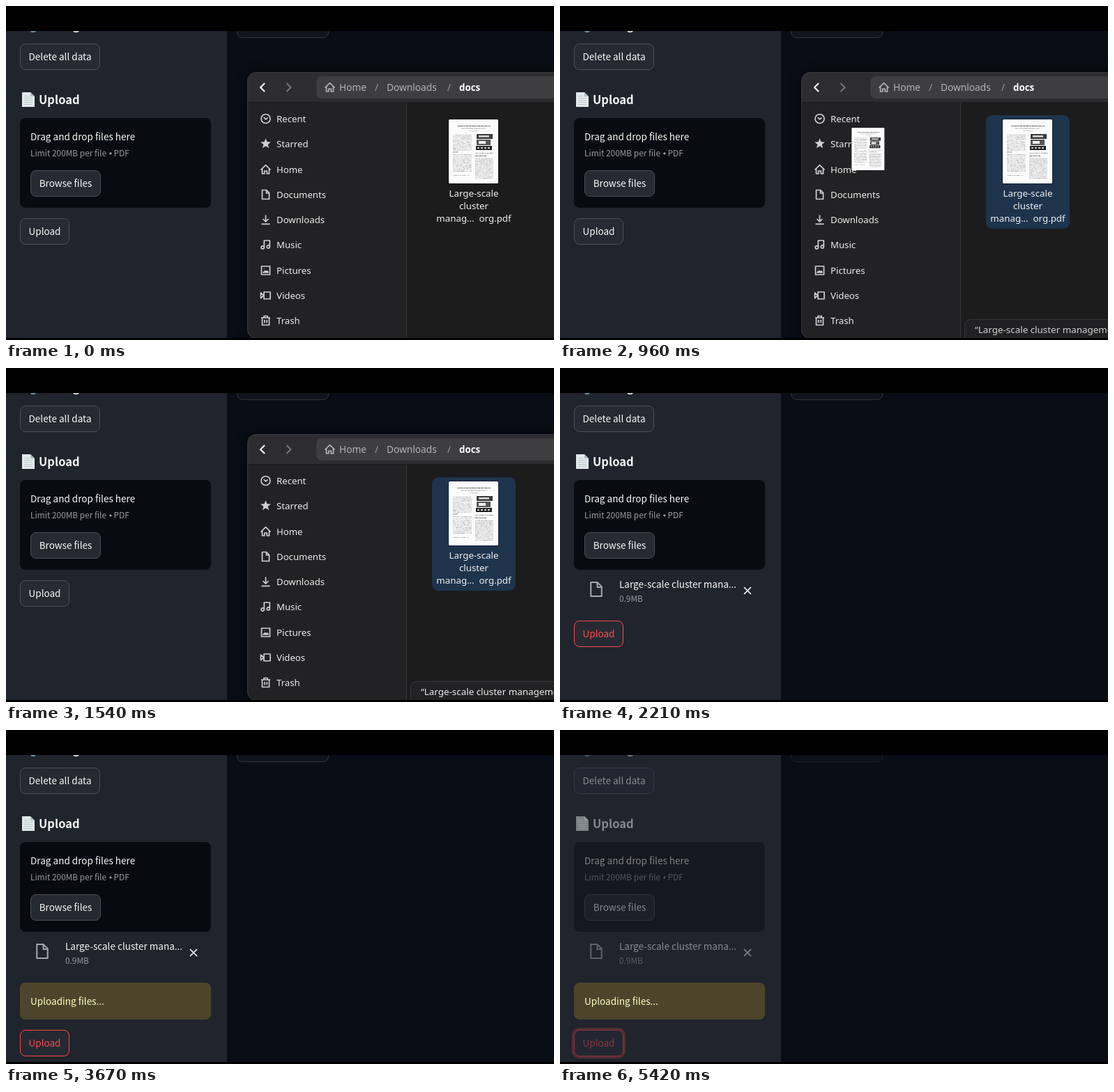
An HTML page with a canvas that plays this animation: 786 by 480 pixels, repeating every 5960 ms.

```html
<!DOCTYPE html>
<html lang="en">
<head>
<meta charset="utf-8">
<title>Upload a file</title>
<style>
html, body { margin: 0; width: 100%; height: 100%; overflow: hidden; background: #000; }
canvas { display: block; }
</style>
</head>
<body>
<canvas id="stage" width="786" height="480"></canvas>
<script>
const ctx = document.getElementById('stage').getContext('2d');
const LOOP = 5960;
const WEB = '"Noto Sans CJK SC", "Noto Sans CJK JP", "Noto Sans CJK", sans-serif';
const DESK = '"Noto Sans", sans-serif';
const BODY = '13.55px ' + WEB, SMALL = '11.85px ' + WEB, HEAD = 'bold 16.5px ' + WEB;
const LABEL = '13.3px ' + DESK, PLACE = '13.2px ' + DESK, CRUMB = '500 13.7px ' + DESK;
const RED = '#ff4b4b', WHITE = '#fafafa';

// Moments of the story, in ms
const SELECT = 670, DRAG = 780, ARRIVE = 1130, DROP = 1330, LISTED = 1580,
  HOVER = 2210, PRESS = 2920, RELEASE = 3080, ALERT = 3120, STALE = 3600, FOCUS = 5420;

const clamp = v => Math.max(0, Math.min(1, v));
const progress = (t, from, to) => clamp((t - from) / (to - from));
const smooth = p => p * p * (3 - 2 * p);
const mix = (a, b, p) => a + (b - a) * p;

function box(x, y, w, h, r, fill, stroke, width = 1) {
  ctx.beginPath();
  ctx.roundRect(x, y, w, h, r);
  if (fill) { ctx.fillStyle = fill; ctx.fill(); }
  if (stroke) { ctx.strokeStyle = stroke; ctx.lineWidth = width; ctx.stroke(); }
}

function rect(x, y, w, h, fill) {
  ctx.fillStyle = fill;
  ctx.fillRect(x, y, w, h);
}

function text(str, x, y, font, fill, align = 'left') {
  ctx.font = font;
  ctx.fillStyle = fill;
  ctx.textAlign = align;
  ctx.fillText(str, x, y);
}

function icon(path, x, y, color, { width = 1.7, solid = false, scale = 1 } = {}) {
  ctx.save();
  ctx.translate(x, y);
  ctx.scale(scale, scale);
  ctx.lineWidth = width;
  ctx.lineJoin = 'round';
  ctx.strokeStyle = ctx.fillStyle = color;
  const shape = new Path2D(path);
  solid ? ctx.fill(shape) : ctx.stroke(shape);
  ctx.restore();
}

function button(label, x, y, w, style = {}) {
  const { fill = '#262a33', edge = '#4b4e56', ink = WHITE } = style;
  box(x + .5, y + .5, w - 1, 37, 7.5, fill, edge);
  text(label, x + w / 2, y + 24, BODY, ink, 'center');
}

function starPath() {
  let d = '';
  for (let i = 0; i < 10; i++) {
    const r = i % 2 ? 3.3 : 7.8, a = i * Math.PI / 5;
    d += (i ? 'L' : 'M') + r * Math.sin(a) + ' ' + -r * Math.cos(a);
  }
  return d + 'Z';
}

const HOME = 'M-7 .5L0-6.3 7 .5M-5-1V6H-1.8V2H1.8V6H5V-1';
const SHEET = 'M-5-6.5H1L5-2.5V6.5H-5ZM1-6V-2H5';
const PLACES = [
  ['Recent', 'M6.5 0A6.5 6.5 0 1 1-6.5 0A6.5 6.5 0 1 1 6.5 0M-2.8-1.8L0 .8 3-1.5'],
  ['Starred', starPath()],
  ['Home', HOME],
  ['Documents', SHEET],
  ['Downloads', 'M0-6.5V3M-4-1L0 3 4-1M-6 6.3H6'],
  ['Music', 'M-2.2 4V-6H5.8V3M-2.2 4A2.1 2.1 0 1 1-6.4 4A2.1 2.1 0 1 1-2.2 4M5.8 3A2.1 2.1 0 1 1 1.6 3A2.1 2.1 0 1 1 5.8 3'],
  ['Pictures', 'M-6-6H6V6H-6ZM-3.5 3L-1 .8 1 2 2.5 .8 3.5 3ZM-2.5-2.5H-2'],
  ['Videos', 'M-2.5-5H6.5V5H-2.5ZM-7-3.8L-3 0-7 3.8Z'],
  ['Trash', 'M-6.5-4H6.5M-2.5-4V-6.5H2.5V-4M-5-4V6.5H5V-4M-1.7-1V3.5M1.7-1V3.5']
];

// A two-column paper with one dark figure, drawn in a 71 x 92 space
function paper(x, y, scale) {
  let seed = 7;
  const random = () => (seed = seed * 16807 % 2147483647) / 2147483647;
  const words = (left, right, row, shade) => {
    for (let px = left; px < right;) {
      const w = Math.min(1 + random() * 4, right - px);
      const tone = shade + random() * 60 | 0;
      rect(px, row, w, .8, `rgb(${tone},${tone},${tone})`);
      px += w + .7;
    }
  };
  ctx.save();
  ctx.translate(x, y);
  ctx.scale(scale, scale);
  box(0, 0, 71, 92, 1.5, '#fcfcfc');
  words(12, 60, 9, 20);
  words(18, 53, 12.5, 110);
  words(29, 43, 16, 170);
  for (let row = 22; row < 86; row += 2) {
    if (row < 46 || row > 48 && row < 76) words(6, 33, row, 150);
    if (row > 54) words(38, 64, row, 145);
  }
  words(6, 13, 46.5, 60);
  words(6, 30, 80, 150);
  rect(40, 21, 23, 7, '#3a3a3a');
  rect(43, 23, 15, 2.5, '#ddd');
  rect(40, 29, 20, 8, '#555');
  rect(43, 31, 10, 4, '#f0f0f0');
  rect(39, 38, 23, 6, '#222');
  for (let i = 0; i < 4; i++) rect(41 + i * 5, 40, 3, 2, '#ccc');
  words(38, 64, 48, 110);
  words(38, 54, 52, 60);
  ctx.restore();
}

function pageEmoji() {
  icon('M-9-10.5H3L9-4.5V10.5H-9Z', 32, 134.5, '#e3eaec', { solid: true });
  icon('M3-10.5V-4.5H9Z', 32, 134.5, '#aebfc7', { solid: true });
  for (let i = 0; i < 5; i++) rect(26, 129 + i * 3, i ? 12 : 7, .8, '#b3c2ca');
}

function uploadButton(t, y) {
  const pressed = t >= PRESS && t < RELEASE;
  if (t >= FOCUS) box(18.5, y - 1.5, 74, 41, 9.5, null, 'rgba(255,75,75,.5)', 3);
  const style = pressed ? { fill: RED, edge: RED, ink: '#fff' }
    : t >= HOVER ? { edge: RED, ink: RED } : {};
  button('Upload', 20, y, 71, style);
}

function sidebar(t, opacity) {
  rect(0, 36, 317, 442, '#20242d');
  ctx.globalAlpha = opacity;
  text('Settings', 47, 34, HEAD, WHITE);
  box(35, 31, 8, 7, 3, '#6f93aa');
  button('Delete all data', 20, 54, 115);
  pageEmoji();
  text('Upload', 47, 140.5, HEAD, WHITE);

  box(20, 161, 274, 129, 8, '#090b12');
  text('Drag and drop files here', 35, 193, BODY, WHITE);
  text('Limit 200MB per file', 35, 216, SMALL, '#999ba0');
  box(148.2, 210.2, 3.4, 3.4, 1.7, '#999ba0');
  text('PDF', 154.5, 216, SMALL, '#999ba0');
  button('Browse files', 35, 236, 101);

  const listed = t >= LISTED, alert = t >= ALERT;
  if (listed) {
    icon(SHEET, 52, 318, '#a5a8af', { scale: 1.55, width: 1.3 });
    text('Large-scale cluster mana...', 85, 316, BODY, WHITE);
    text('0.9MB', 85, 336, SMALL, '#999ba0');
    icon('M-5-5L5 5M5-5L-5 5', 269, 320, WHITE);
  }
  uploadButton(t, alert ? 431 : listed ? 363 : 305);
  ctx.globalAlpha = 1;
  if (alert) {
    box(20, 363, 274, 53, 8, '#4c452b');
    text('Uploading files...', 35, 395, BODY, '#ffffc2');
  }
}

function fileItem(t) {
  if (t >= SELECT) {
    const p = progress(t, 800, 960);
    box(611, 157, 120, 163, 9, `rgb(${mix(37, 30, p)},${mix(69, 52, p)},${mix(105, 77, p)})`);
  }
  box(634, 162, 73, 94, 2, 'rgba(0,0,0,.35)');
  paper(635, 163, 1);
  text('Large-scale', 671, 274, LABEL, '#f0f0f0', 'center');
  text('cluster', 671, 292, LABEL, '#f0f0f0', 'center');
  text('manag…  org.pdf', 671, 310, LABEL, '#f0f0f0', 'center');
}

function fileManager(t) {
  const opacity = 1 - progress(t, LISTED, 1710);
  if (!opacity) return;
  ctx.save();
  ctx.globalAlpha = opacity;
  ctx.shadowColor = 'rgba(0,0,0,.6)';
  ctx.shadowBlur = 16;
  box(346.5, 95.5, 460, 382, 12, '#222224');
  ctx.shadowColor = 'transparent';

  ctx.save();
  ctx.clip();
  rect(346, 95, 440, 44, '#2d2d30');
  rect(575, 139, 211, 340, '#1c1c1d');
  rect(346, 138, 440, 1, '#1b1b1d');
  rect(574, 139, 1, 340, '#363638');
  ctx.restore();
  box(346.5, 95.5, 460, 382, 12, null, '#3c3c40');

  box(445, 101, 360, 32, 8, '#3e3e41');
  icon('M3-6L-3 0 3 6', 368, 117, '#fff', { width: 2.2 });
  icon('M-3-6L3 0-3 6', 405.5, 117, '#77777a', { width: 2 });
  icon(HOME, 464.5, 117, '#b3b3b5');
  text('Home', 478, 122, CRUMB, '#b3b3b5');
  text('/', 529, 122, CRUMB, '#98989a');
  text('Downloads', 546, 122, CRUMB, '#b3b3b5');
  text('/', 633, 122, CRUMB, '#98989a');
  text('docs', 650, 122, 'bold 13.3px ' + DESK, '#fff');

  PLACES.forEach(([name, path], i) => {
    const y = Math.round(162.2 + i * 36.22);
    icon(path, 372.5, y, '#d0d0d1', { solid: name === 'Starred' });
    text(name, 388, y + 5, PLACE, '#ebebeb');
  });
  fileItem(t);

  const status = progress(t, 840, 980);
  if (status) {
    ctx.globalAlpha = opacity * status;
    box(580.5, 450.5, 220, 40, [8, 0, 0, 0], '#222224', '#3a3a3d');
    text('“Large-scale cluster management', 595, 470, '13.4px ' + DESK, '#ededed');
  }
  ctx.restore();
}

function render(t) {
  rect(0, 0, 786, 480, '#000');
  rect(317, 36, 469, 442, '#090d15');
  const opacity = mix(1, .47, Math.pow(progress(t, STALE, 4830), 1.5));
  ctx.globalAlpha = opacity;
  box(331.5, 8.5, 131, 37, 7.5, '#10141c', '#30343c');
  ctx.globalAlpha = 1;
  sidebar(t, opacity);
  fileManager(t);
  if (t >= DRAG && t < DROP) {
    const p = smooth(progress(t, DRAG, ARRIVE));
    paper(mix(637, 221, p), mix(183, 168, p), 47 / 71);
  }
  rect(0, 0, 786, 36, '#000');
  rect(0, 477, 786, 3, '#000');
}

const start = performance.now();
function tick() {
  render((performance.now() - start) % LOOP);
  requestAnimationFrame(tick);
}
tick();
</script>
</body>
</html>
```
